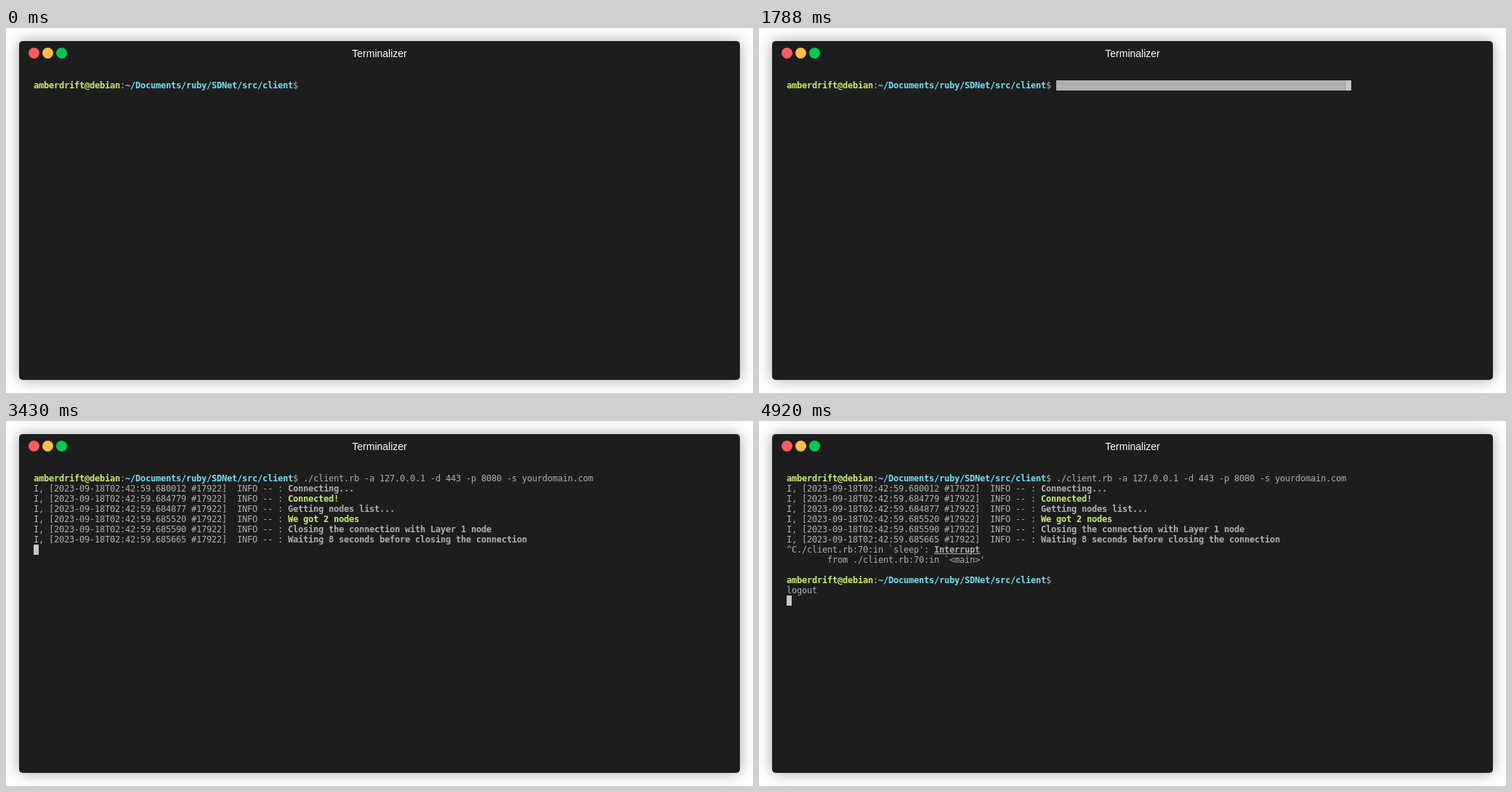
An HTML page that plays this animation: 1028x502 px, repeating every 5.53 s.

```html
<!DOCTYPE html>
<html lang="en">
<head>
<meta charset="utf-8">
<title>Terminalizer</title>
<style>
html, body { margin: 0; width: 100%; height: 100%; overflow: hidden; background: #fff; }
#window {
  position: absolute; left: 18px; top: 18px; width: 992px; height: 466px;
  border-radius: 5px; background: #1d1d1d; box-shadow: 0 0 20px rgba(0, 0, 0, .35);
}
.button { position: absolute; top: 9px; width: 15px; height: 15px; border-radius: 50%; }
#title {
  position: absolute; left: 0; top: 9px; width: 100%; text-align: center; color: #fff;
  font: 14px/16px "Liberation Sans", Arial, sans-serif;
}
#screen {
  position: absolute; left: 20px; top: 54px; color: #afafaf;
  font: 12px/14px "DejaVu Sans Mono", monospace;
}
.row { height: 14px; white-space: pre; }
.row span { display: inline-block; width: 7px; height: 14px; vertical-align: top; }
.bold, .green, .blue { font-weight: bold; }
.green { color: #c8ed71; }
.blue { color: #75dff2; }
.under { font-weight: bold; text-decoration: underline; }
.block { background: #afafaf; }
.cursor { background: #c7c7c7; }
</style>
</head>
<body>
<div id="window">
  <div class="button" style="left:13px;background:#ff5c5c"></div>
  <div class="button" style="left:32px;background:#ffbd4c"></div>
  <div class="button" style="left:51px;background:#00ca56"></div>
  <div id="title">Terminalizer</div>
  <div id="screen"></div>
</div>
<script>
const LOOP = 5530;
const screenEl = document.getElementById('screen');

// A row is a list of [text, style] runs.
const command = './client.rb -a 127.0.0.1 -d 443 -p 8080 -s yourdomain.com';
const cursor = [' ', 'cursor'];
const prompt = [
  ['amberdrift@debian', 'green'], [':'],
  ['~/Documents/ruby/SDNet/src/client', 'blue'], ['$ ']
];
const log = (micros, text, style = 'bold') =>
  [[`I, [2023-09-18T02:42:59.${micros} #17922]  INFO -- : `], [text, style]];

const entered = [[...prompt, [command]]];
const logged = [
  ...entered,
  log(680012, 'Connecting...'),
  log(684779, 'Connected!', 'green'),
  log(684877, 'Getting nodes list...'),
  log(685520, 'We got 2 nodes', 'green'),
  log(685590, 'Closing the connection with Layer 1 node'),
  log(685665, 'Waiting 8 seconds before closing the connection')
];
const stopped = [
  ...logged,
  [["^C./client.rb:70:in `sleep': "], ['Interrupt', 'under']],
  [["        from ./client.rb:70:in `<main>'"]]
];

const scenes = [
  { at: 0, rows: [prompt] },
  { at: 1320, rows: [[...prompt, [' '.repeat(command.length), 'block'], cursor]] },
  { at: 2100, rows: [...entered, [cursor]] },
  { at: 2230, rows: [...logged, [cursor]] },
  { at: 4230, rows: [...stopped, [cursor]] },
  { at: 4330, rows: [...stopped, [], [...prompt, cursor]] },
  { at: 4920, rows: [...stopped, [], prompt, [['logout']], [cursor]] }
];

function makeRow(runs) {
  const row = document.createElement('div');
  row.className = 'row';
  for (const [text, style = ''] of runs) {
    for (const ch of text) {
      const cell = document.createElement('span');
      cell.className = style;
      cell.textContent = ch;
      row.append(cell);
    }
  }
  return row;
}

let shown = null;
function draw(time) {
  const scene = scenes.findLast(s => s.at <= time % LOOP);
  if (scene === shown) return;
  shown = scene;
  screenEl.replaceChildren(...scene.rows.map(makeRow));
}

const start = performance.now();
function tick() {
  draw(performance.now() - start);
  requestAnimationFrame(tick);
}
tick();
</script>
</body>
</html>
```
